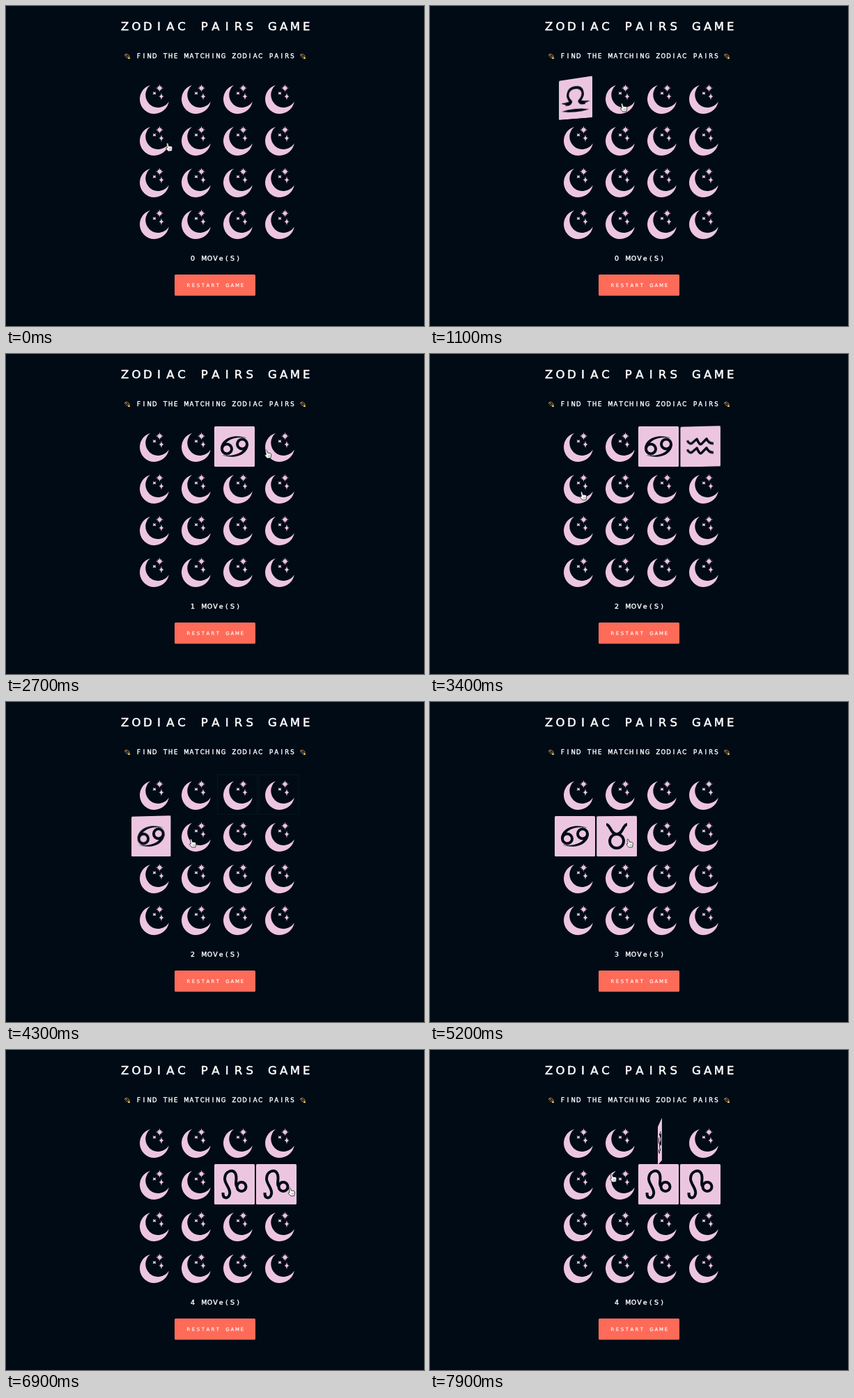
Animation, 600 px wide and 460 px high, one loop 8 s. Source, as an HTML page:

```html
<!DOCTYPE html>
<html lang="en">
<head>
<meta charset="utf-8">
<title>Zodiac Pairs Game</title>
<style>
  html, body { margin: 0; width: 100%; height: 100%; overflow: hidden; background: #000b16; }
  #stage { position: relative; width: 600px; height: 460px; overflow: hidden; background: #000b16; }
  #page { position: absolute; left: 0; top: 0; }
  text { font-family: "DejaVu Sans", sans-serif; fill: #fff; stroke: #fff; text-anchor: middle; white-space: pre; }
  .title { font-size: 16.5px; stroke-width: .5px; }
  .hint { font-size: 8.5px; stroke-width: .4px; }
  .moves { font-size: 9.5px; stroke-width: .4px; }
  .restart { font-size: 7px; stroke-width: .15px; }
  #board { position: absolute; left: 180px; top: 104px; }
  .column { position: absolute; top: 0; width: 60px; height: 240px; perspective: 530px; }
  .card { position: absolute; width: 60px; height: 58px; transform-style: preserve-3d; }
  .card svg { position: absolute; left: 3px; top: 0; width: 58px; height: 58px; backface-visibility: hidden; }
  .front { transform: rotateY(180deg); }
  .back { fill: #ecc6e0; }
  .edge { fill: none; stroke: #081924; stroke-width: .8; }
  .ink { fill: none; stroke: #000b16; stroke-width: 4; stroke-linejoin: round; }
  .ink .solid { fill: #000b16; stroke: none; }
  #cursor { position: absolute; left: -8px; top: -8px; }
</style>
</head>
<body>
<div id="stage">
  <svg id="page" width="600" height="460">
    <defs>
      <g id="dizzy">
        <path d="M-3.6 -1C-3.4 -3.6 .6 -3.8 2.2 -1.2L3.4 1" fill="none" stroke="#b9823a" stroke-width="1"/>
        <path d="M-3 -1.4C-1.6 -2.4 .2 -.6 1.6 1.4M-3 -.4C-2 1 -1 2 .6 2.4" fill="none" stroke="#e0a348" stroke-width=".9"/>
        <path d="M2.4 .6L3 2L4.6 2.4L3.5 3.3L3.4 4.4L2.2 3.7L.8 4L1.4 2.6Z" fill="#ffd66e"/>
      </g>
    </defs>
    <text class="title" data-pitch="16.28" x="170.7" y="35">ZODIAC PAIRS GAME</text>
    <use href="#dizzy" x="174" y="72"/>
    <text class="hint" data-pitch="7.6" x="190.5" y="75.3">FIND THE MATCHING ZODIAC PAIRS</text>
    <use href="#dizzy" x="426" y="72"/>
    <text class="moves" id="moves" data-pitch="8.13" x="268" y="366.3">0 MOVe(S)</text>
    <rect x="242" y="386" width="116" height="30.5" rx="1.5" fill="#ff6b59"/>
    <text class="restart" data-pitch="7" x="262" y="404.3">RESTART GAME</text>
  </svg>
  <div id="board"></div>
  <svg id="cursor" width="16" height="16" viewBox="-8 -8 16 16">
    <path d="M-3.6 -5.2Q-2.4 -6.8 -1.4 -5L-.5 -1.8L3.2 -1.4Q4.8 -.8 4.8 1L4 5.6L-1 6L-4.6 1.8Q-4.6 .4 -2.6 1Z"
      fill="#fff" stroke="#1a1a1a" stroke-width=".8"/>
    <path d="M.6 1.6V4M2.4 1.4V3.8" stroke="#555" stroke-width=".6"/>
  </svg>
</div>
<script>
const LOOP = 8000, STEP = 100, FLIP = 500;

const signs = {
  libra: `<path d="M-17 7C-11 8 -8 6 -7 4C-17 -4 -14 -16 0 -16C14 -16 17 -4 7 4C8 6 11 8 17 7"/>
    <path class="solid" d="M-25 5Q-16 5 -8 3L-7 6Q-14 10 -25 5ZM25 5Q16 5 8 3L7 6Q14 10 25 5Z"/>
    <path class="solid" d="M-24 17Q0 12.5 24 17Q0 21.5 -24 17Z"/>`,
  aries: `<path d="M0 19C-1 2 -4 -16 -12 -16C-18 -16 -20 -8 -16 -3M0 19C1 2 4 -16 12 -16C18 -16 20 -8 16 -3" stroke-width="3.6"/>`,
  cancer: [0, 180].map(turn => `<g transform="rotate(${turn})"><circle cx="-11" cy="3.5" r="7"/>
    <path class="solid" d="M-20 4C-20 -12 0 -19 18 -12C3 -15 -11 -10 -14 -2Z"/></g>`).join(""),
  aquarius: [-7, 6].map(y => `<path transform="translate(0 ${y})" stroke-width="3.4"
    d="M-19 -2Q-15 5 -11 1L-5 -4Q-1 6 2 3L9 -4Q12 3 19 3"/>`).join(""),
  taurus: `<circle cy="7" r="10"/><path d="M-15 -17C-9 -17 -9 -3 0 -3C9 -3 9 -17 15 -17"/>`,
  leo: `<path d="M-16.5 12C-17 21 -9 22 -7 14C-5 6 -15 -1 -14 -9C-13 -19 -3 -22 1 -16C5 -9 0 -2 3 3"/>
    <circle cx="10" cy="3.5" r="6.5"/>`
};

// Times at which each card starts to turn over, by cell.
const plays = [
  ["libra", 845, 1980], ["aries", 1290, 1980], ["cancer", 2035, 3780, 7745], ["aquarius", 3025, 3780],
  ["cancer", 3960, 5500], ["taurus", 4800, 5500], ["leo", 5610], ["leo", 6270]
];
const moveTimes = [1290, 3025, 4800, 6270];

// Pointer moves: start, end, x, y.
const pointer = [
  [0, 0, 234, 203], [50, 400, 219, 147], [850, 1080, 278, 146], [1600, 1950, 331, 144],
  [2120, 2340, 376, 144], [3080, 3380, 220, 204], [4020, 4280, 268, 203],
  [5080, 5420, 333, 203], [5850, 5990, 411, 205], [6850, 7500, 337, 143], [7700, 7900, 263, 184]
];

const star = (x, y, rx, ry, turn = 0) =>
  `<path transform="translate(${x} ${y}) rotate(${turn})"
    d="M0 ${-ry}Q.4 -.4 ${rx} 0Q.4 .4 0 ${ry}Q-.4 .4 ${-rx} 0Q-.4 -.4 0 ${-ry}Z"/>`;

const back = `<svg class="back" viewBox="183 104 58 58">
  <rect class="edge" x="183.5" y="104.5" width="57" height="57"/>
  <path d="M207 113.8A21 21 0 1 0 233.7 137.5A18.1 18.1 0 1 1 207 113.8Z"/>
  ${star(220.5, 118, 5.8, 5.8)}${star(220.5, 118, 4.6, 4.6, 45)}
  ${star(223, 130, 3.8, 5.6)}${star(213, 125.3, 3.2, 3.2, 45)}</svg>`;

const front = sign => `<svg class="front" viewBox="-29 -29 58 58">
  <rect x="-29" y="-29" width="58" height="58" rx="1.5" fill="#ecc6e0"/>
  <g class="ink">${signs[sign]}</g></svg>`;

function addDiv(parent, className, left, top) {
  const el = document.createElement("div");
  el.className = className;
  el.style.left = left + "px";
  el.style.top = top + "px";
  return parent.appendChild(el);
}

const board = document.getElementById("board");
const columns = [0, 1, 2, 3].map(i => addDiv(board, "column", i * 60, 0));
const cards = Array.from({ length: 16 }, (_, i) => {
  const [sign, ...turns] = plays[i] || [];
  const el = addDiv(columns[i % 4], "card", 0, Math.floor(i / 4) * 60);
  el.innerHTML = back + (sign ? front(sign) : "");
  return { el, turns, edge: el.querySelector(".edge") };
});

// Sets every letter in the middle of a slot of fixed pitch.
for (const line of document.querySelectorAll("text")) {
  const first = +line.getAttribute("x"), pitch = +line.dataset.pitch;
  line.setAttribute("x", [...line.textContent].map((_, i) => first + i * pitch).join(" "));
}

const clamp = v => Math.min(1, Math.max(0, v));
const smooth = v => v * v * (3 - 2 * v);

// cubic-bezier(.25, .1, .25, 1)
function ease(x) {
  if (x <= 0 || x >= 1) return clamp(x);
  const curve = (s, a, b) => 3 * (1 - s) * (1 - s) * s * a + 3 * (1 - s) * s * s * b + s ** 3;
  let low = 0, high = 1;
  for (let i = 0; i < 24; i++) {
    const mid = (low + high) / 2;
    if (curve(mid, .25, .25) < x) low = mid; else high = mid;
  }
  return curve(low, .1, 1);
}

const cursor = document.getElementById("cursor");
const moves = document.getElementById("moves");

function draw(t) {
  for (const { el, turns, edge } of cards) {
    const angle = turns.reduce((sum, start, i) =>
      sum + (i % 2 ? -180 : 180) * ease((t - start) / FLIP), 0);
    const active = turns.some(start => t >= start && t < start + 600);
    el.style.transform = angle ? `rotateY(${angle}deg)` : "none";
    edge.style.opacity = active ? 1 : .15;
  }
  let [, , x, y] = pointer[0];
  for (const [start, end, toX, toY] of pointer.slice(1)) {
    const p = smooth(clamp((t - start) / (end - start)));
    x += (toX - x) * p;
    y += (toY - y) * p;
  }
  cursor.style.transform = `translate(${x}px, ${y}px)`;
  moves.textContent = moveTimes.filter(time => t >= time).length + " MOVe(S)";
}

let origin;
function tick(now) {
  origin ??= now;
  // The small lead keeps steps from landing late on a frame boundary.
  draw(Math.floor((now - origin + 20) / STEP) * STEP % LOOP);
  requestAnimationFrame(tick);
}
draw(0);
requestAnimationFrame(tick);
</script>
</body>
</html>
```
